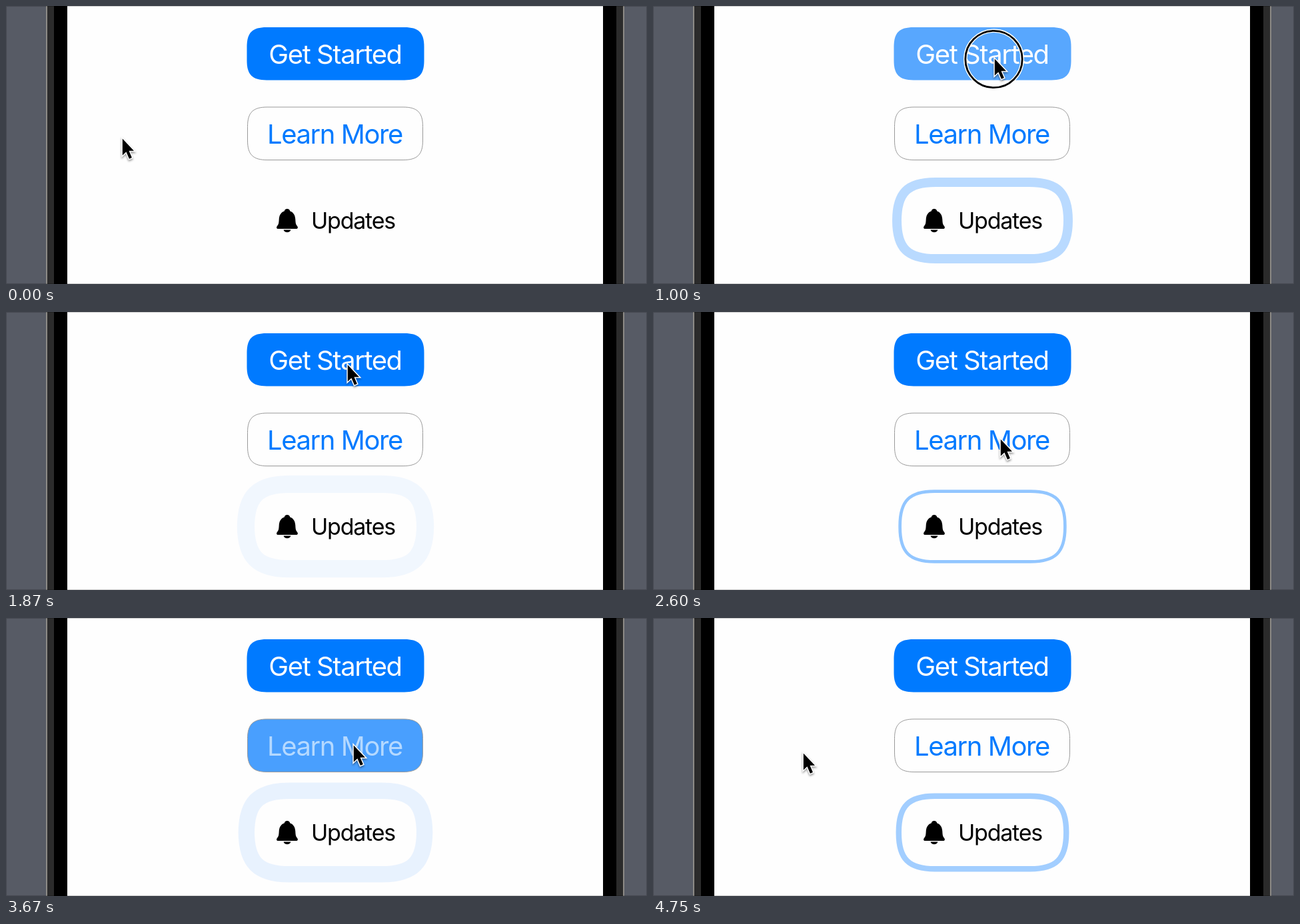
Write an HTML page that moves like this. It is 962x418 px and loops after 4830 ms.

```html
<!DOCTYPE html>
<html lang="en">
<head>
<meta charset="utf-8">
<title>Buttons</title>
<style>
  html, body { margin: 0; height: 100%; overflow: hidden; }
  svg { display: block; width: 962px; height: 418px; }
  text {
    font-family: Inter, "Liberation Sans", sans-serif;
    font-size: 40px;
    font-optical-sizing: none;
    letter-spacing: -.036em;
    text-anchor: middle;
  }
</style>
</head>
<body>
<svg viewBox="0 0 962 418">
  <rect width="962" height="418" fill="#575b65"/>
  <rect x="60" width="868" height="418" fill="#8c8a86"/>
  <rect x="62" width="864" height="418" fill="#2b2b2b"/>
  <rect x="72" width="844" height="418"/>
  <rect x="92" width="804" height="418" fill="#fefefe"/>
  <rect x=".5" y=".5" width="961" height="417" fill="none" stroke="#000" stroke-opacity=".2"/>

  <path id="start" fill="#007aff"/>
  <text x="494" y="87" fill="#fff">Get Started</text>

  <path id="learn" fill="#007aff" stroke="#999"/>
  <text id="learnText" x="493.5" y="206.5">Learn More</text>

  <path id="ring" fill="none" stroke="#007aff"/>
  <path d="M422 305c-2.6 0-4 1.6-4.3 3.6-5.4 1.8-7.7 6.500-8 12.400-.3 6.200-.8 7.500-2.800 10-1.500 1.900-.9 4 1.600 4h27c2.500 0 3.100-2.100 1.600-4-2-2.500-2.500-3.800-2.800-10-.3-5.900-2.600-10.600-8-12.400-.3-2-1.700-3.600-4.300-3.600zM416.500 336.500h11c-.6 2.300-2.800 3.700-5.500 3.700s-4.900-1.400-5.500-3.700z"/>
  <text x="521" y="335" style="font-size:34px">Updates</text>

  <g id="pointer">
    <g id="click" fill="none">
      <circle cx="-.5" cy="1" r="42.700" stroke="#fff" stroke-width="5.500"/>
      <circle cx="-.5" cy="1" r="42.700" stroke="#000" stroke-width="2.800"/>
    </g>
    <path d="M.8 .6V25.500l5.600-5.300 4.500 10.500 4-1.700-4.400-10.200H18z" stroke="#fff" stroke-width="3"
      paint-order="stroke" style="filter:drop-shadow(0 2px 1.5px #0006)"/>
  </g>
</svg>
<script>
const LOOP = 4830;
const PULSE = 2000, FIRST_PULSE = 430;
const el = id => document.getElementById(id);

const progress = (t, from, to) => Math.min(1, Math.max(0, (t - from) / (to - from)));
const smooth = (t, from, to) => {
  const p = progress(t, from, to);
  return p * p * (3 - 2 * p);
};

// Rounded rectangle with continuous-curvature corners
function squircle(x, y, w, h, r) {
  const k = 1.28 * r, c = .926 * r, e = k - c;
  return `M${x + k} ${y}h${w - 2 * k}c${c} 0 ${k} ${e} ${k} ${k}` +
    `v${h - 2 * k}c0 ${c} ${-e} ${k} ${-k} ${k}` +
    `h${2 * k - w}c${-c} 0 ${-k} ${-e} ${-k} ${-k}` +
    `v${2 * k - h}c0 ${-c} ${e} ${-k} ${k} ${-k}z`;
}

// Instant on press, short fade after release
const pressed = (t, down, up) => t < down ? 0 : 1 - smooth(t, up, up + 200);

function drawRing(t) {
  const p = t < FIRST_PULSE ? 1 : (t - FIRST_PULSE) % PULSE / PULSE;
  const spread = 28.5 * (1 - (1 - p) ** 2), half = spread / 2;
  el('ring').setAttribute('d', squircle(373 - half, 272 - half, 243 + spread, 101 + spread, 38 + half));
  el('ring').setAttribute('stroke-width', spread);
  el('ring').setAttribute('stroke-opacity', .5 * (1 - p) ** 1.8);
}

function drawPointer(t) {
  const toStart = smooth(t, 220, 690), toLearn = smooth(t, 2280, 2580);
  const x = 174 + 338 * toStart + 9 * toLearn - 296 * smooth(t, 3860, 4500);
  const y = 199 - 120 * toStart + 112 * toLearn + 12 * smooth(t, 4200, 4550);
  el('pointer').setAttribute('transform', `translate(${x} ${y})`);
}

function draw(now) {
  const t = now % LOOP;
  const start = pressed(t, 880, 1630), learn = pressed(t, 3080, 3600);
  el('start').setAttribute('fill-opacity', 1 - .35 * start);
  el('learn').setAttribute('fill-opacity', learn);
  el('learnText').setAttribute('fill', `rgb(${255 * learn},${122 + 133 * learn},255)`);
  el('click').setAttribute('opacity', t >= 880 && t < 1680 || t >= 3080 && t < 3640 ? 1 : 0);
  drawRing(t);
  drawPointer(t);
  requestAnimationFrame(() => draw(performance.now()));
}

el('start').setAttribute('d', squircle(361.5, 32, 266, 79.5, 23));
el('learn').setAttribute('d', squircle(362.5, 152, 263, 79.5, 23));
draw(performance.now());
</script>
</body>
</html>
```
